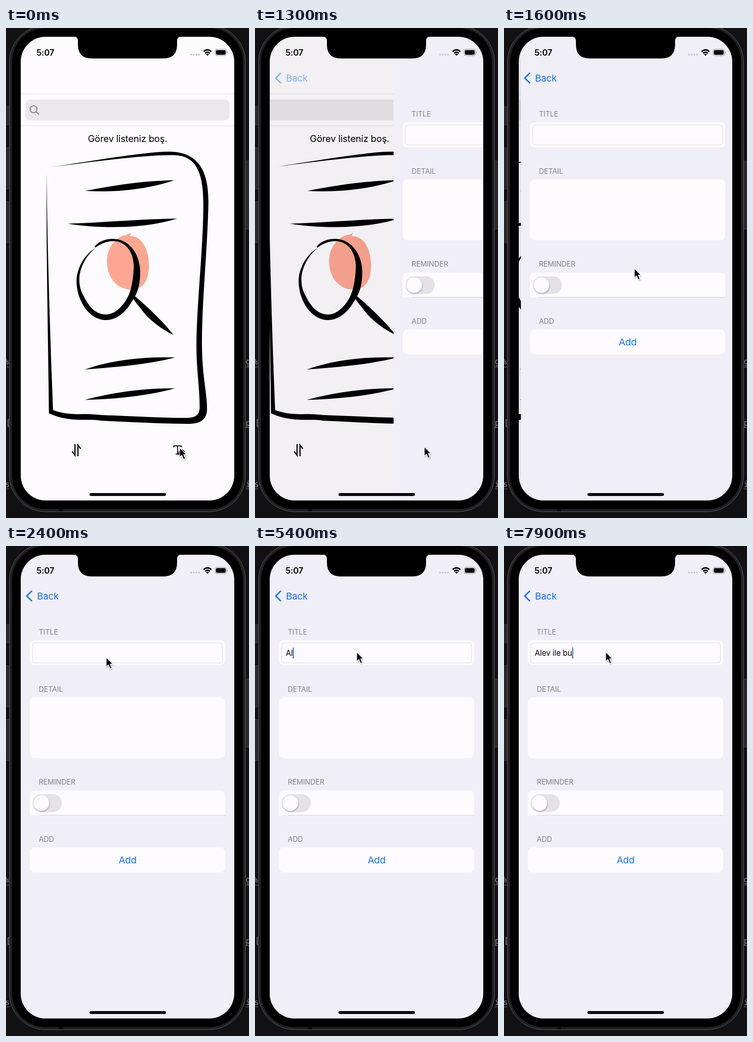
Write an HTML page without scripts that moves like this. It is 527 px wide and 1062 px high and loops after 8 s.

```html
<!DOCTYPE html>
<html lang="tr">
<head>
<meta charset="utf-8">
<title>Görev listesi</title>
<style>
@property --push { syntax: "<number>"; inherits: true; initial-value: 0; }
@property --typed { syntax: "<integer>"; inherits: true; initial-value: 0; }

html, body { margin: 0; width: 527px; height: 1062px; overflow: hidden; background: #111114; }
body { position: relative; font-family: Inter, "Open Sans", sans-serif; }
svg { display: block; }
text { letter-spacing: -.01em; }

.screen { animation: push 8s step-end infinite; }
.home { transform: translateX(calc(var(--push) * -139px)); }
.dim { opacity: calc(var(--push) * .105); }
.form { transform: translateX(calc((1 - var(--push)) * 463px)); }
.back { opacity: calc(var(--push) * 1.2); }
.pointer { animation: point 8s step-end infinite; }

.label { font-size: 15.7px; fill: #858389; }
.card { fill: #fdfbfe; }
.blue { fill: #1673e6; font-size: 20.5px; }
.rule { stroke: #dfdde2; stroke-width: 1.2; }
.code { font: 17px "DejaVu Sans Mono", monospace; fill: #85858a; }

.field {
  position: absolute; left: 66.5px; top: 220px; height: 24px;
  font-size: 17px; line-height: 24px; white-space: pre; color: #08080a;
  animation: type 8s step-end infinite;
}
.field span {
  font-size: calc(17px * clamp(0, var(--typed) - var(--i), 1));
  line-height: 0; letter-spacing: -.012em;
}
.field b {
  display: inline-block; width: 2.3px; height: 23.5px; vertical-align: top;
  background: #3563c3; animation: blink 8s step-end infinite;
}

@keyframes push {
  0% { --push: 0; }
  16.25% { --push: .42; }
  17.5% { --push: .84; }
  18.75% { --push: .96; }
  20% { --push: .99; }
  21.25%, 100% { --push: 1; }
}
@keyframes point {
  0% { transform: translate(376px, 909px); }
  2.5% { transform: translate(373px, 908px); }
  5% { transform: translate(369px, 907px); }
  7.5% { transform: translate(366.4px, 906.6px); }
  18.75% { transform: translate(350px, 825px); }
  20% { transform: translate(282px, 520px); }
  21.25% { transform: translate(230px, 295px); }
  22.5% { transform: translate(216.6px, 240.5px); }
  37.5% { transform: translate(219px, 234px); }
  38.75%, 100% { transform: translate(219.8px, 228.8px); }
}
@keyframes blink {
  0% { opacity: 0; }
  46.25% { opacity: 1; }
  55% { opacity: .5; }
  56.25% { opacity: 0; }
  60% { opacity: .5; }
  61.25%, 100% { opacity: 1; }
}
@keyframes type {
  0% { --typed: 0; }
  63.75% { --typed: 1; }
  66.25% { --typed: 2; }
  68.75% { --typed: 3; }
  71.25% { --typed: 4; }
  75% { --typed: 5; }
  80% { --typed: 6; }
  83.75% { --typed: 7; }
  86.25% { --typed: 8; }
  88.75% { --typed: 9; }
  92.5% { --typed: 10; }
  96.25%, 100% { --typed: 11; }
}
</style>
</head>
<body>
<svg width="527" height="1062" viewBox="0 0 527 1062">
  <defs>
    <clipPath id="glass"><rect x="32" y="19" width="463" height="1005" rx="54"/></clipPath>
    <filter id="soft" x="-50%" y="-50%" width="200%" height="200%">
      <feDropShadow dx="1" dy="2" stdDeviation="1.8" flood-opacity=".28"/>
    </filter>
  </defs>

  <!-- Desktop behind the device -->
  <g class="code">
    <text x="-4" y="729">%</text><text x="0" y="862">[</text><text x="-2" y="995">s</text>
    <text x="520" y="729">g</text><text x="520" y="862">p</text><text x="520" y="995">i</text>
    <path d="M0 735H7M0 999H7M520 735H527M520 866H527M520 999H527" stroke="#77777c"/>
  </g>
  <g fill="#29292c" stroke="#414145">
    <rect x="-4" y="170" width="12" height="40"/>
    <rect x="-4" y="259" width="12" height="90"/>
    <rect x="-4" y="376" width="12" height="89"/>
    <rect x="519" y="288" width="12" height="148"/>
  </g>

  <!-- Device body -->
  <rect x="7.5" y="-5.5" width="512" height="1054" rx="79" fill="#222225" stroke="#5b5b5f"/>
  <rect x="115" y="1043" width="9" height="5" fill="#0e0e10"/>
  <rect x="13" y="0" width="501" height="1043" rx="73"/>

  <g clip-path="url(#glass)">
    <g class="screen">
      <g class="home">
        <rect class="card" x="32" y="19" width="463" height="1005"/>
        <path class="rule" d="M32 143H495M32 212H495"/>
        <rect x="42" y="155" width="443" height="45" rx="11" fill="#eae8eb"/>
        <g fill="none" stroke="#7f7d82" stroke-width="2" stroke-linecap="round">
          <circle cx="59.7" cy="176" r="7.6"/><path d="M65.2 181.5L71 187"/>
        </g>
        <text x="263.5" y="247" font-size="20.2" text-anchor="middle">Görev listeniz boş.</text>

        <path fill="#fda793" d="M268 451C295 450 310 480 310 515C310 550 295 567 272 567C240 567 219 540 219 505C219 475 240 452 258 449Q266 447 271 444Z"/>
        <!-- Sheet outline -->
        <path d="M96 302C200 286 300 269 350 268C410 267 440 300 439 380C437 480 424 600 425 690C426 760 436 790 436 825C436 850 420 858 395 858C340 858 270 854 205 851C190 848 170 850 155 849C130 848 110 843 93 835C92 700 87 500 88 316C90 500 97 700 102 828C120 835 140 837 160 837C180 836 195 838 210 839C270 841 340 845 390 845C412 845 420 838 420 822C420 780 413 740 413 690C413 600 428 480 428 380C428 310 410 279 370 276C320 273 200 288 96 302Z"/>
        <!-- Brush lines -->
        <path d="M172 353C230 341 300 331 365 330C310 349 240 357 172 353Z
                 M134 424C210 422 290 414 371 413C300 436 200 435 134 424Z
                 M171 740C230 719 300 712 367 714C310 729 240 735 171 740Z
                 M171 806C230 790 300 780 366 781C310 797 240 804 171 806Z"/>
        <!-- Magnifier -->
        <path d="M192 474C200 463 215 457 232 457C265 457 290 487 291 528C291 560 284 578 271 596C258 618 238 633 217 633C180 633 153 590 153 548C153 520 172 488 196 476C175 490 159 520 159 545C159 560 163 572 168 580C180 605 195 621 217 621C240 621 262 595 270 568C275 550 277 530 277 515C276 485 260 464 236 462C220 461 205 467 194 476Z
                 M278 580C300 598 340 635 363 665C340 655 310 632 296 613C288 602 276 590 276 584Z"/>

        <!-- Toolbar -->
        <path d="M149.6 902V926L143.6 918M156 928V904L162 912" fill="none" stroke="#000" stroke-width="2.6"/>
        <path d="M363.8 909V905.8H380V909M372 906V923.5M368 923.5H376" fill="none" stroke="#000" stroke-width="1.9"/>
        <circle cx="381" cy="920.8" r="7.2"/>
        <path d="M377.3 920.8H384.7M381 917.1V924.5" stroke="#fdfbfe" stroke-width="1.5"/>
      </g>
      <rect class="dim" x="32" y="19" width="463" height="1005"/>

      <g class="form">
        <rect x="32" y="19" width="463" height="1005" fill="#f0eef6"/>
        <g class="label">
          <text x="71" y="191.5">TITLE</text><text x="71" y="315.5">DETAIL</text>
          <text x="71" y="517.3">REMINDER</text><text x="71" y="641">ADD</text>
        </g>
        <g class="card">
          <rect x="51.5" y="204" width="424" height="54.5" rx="11"/>
          <rect x="51.5" y="328" width="424" height="132" rx="11"/>
          <path d="M51.5 584V541Q51.5 530 62.5 530H464.5Q475.5 530 475.5 541V584Z"/>
          <rect x="51.5" y="653.5" width="424" height="54" rx="11"/>
        </g>
        <rect x="57.5" y="210" width="412" height="43.5" rx="6" fill="none" class="rule"/>
        <path d="M72 583.5H475.5" stroke="#d3d1d6" stroke-width="1.2"/>
        <rect x="57.5" y="538" width="63.5" height="38.5" rx="19.2" fill="#e4e2e6"/>
        <circle class="card" cx="76.7" cy="557.2" r="16.8" filter="url(#soft)"/>
        <text class="blue" x="263.7" y="688" text-anchor="middle">Add</text>
      </g>

      <g class="back">
        <path d="M55.5 98L45 108.4L55.5 118.8" fill="none" stroke="#1673e6" stroke-width="3" stroke-linecap="round" stroke-linejoin="round"/>
        <text class="blue" x="67.2" y="115.7">Back</text>
      </g>
    </g>

    <!-- Status bar -->
    <path d="M146 18Q156 19 156 28V36Q156 66 186 66H341Q371 66 371 36V28Q371 19 381 18Z"/>
    <text x="66" y="59.7" font-size="18.3" font-weight="600">5:07</text>
    <path d="M401.5 57.7H420" stroke="#c6c4c9" stroke-width="3.8" stroke-linecap="round" stroke-dasharray="0 5.7"/>
    <path d="M428.6 51.2Q437 43.6 445.4 51.2M431.8 54.8Q437 50.2 442.2 54.8" fill="none" stroke="#000" stroke-width="3"/>
    <path d="M433.7 57Q437 54.4 440.3 57L437 60.3Z"/>
    <rect x="453.5" y="46.2" width="24.5" height="13.6" rx="4" fill="none" stroke="#98969b" stroke-width="1.2"/>
    <rect x="455.3" y="48" width="21" height="10" rx="2.4"/>
    <path d="M479.5 50.5Q482.5 53 479.5 55.5Z" fill="#98969b"/>
    <rect x="181" y="1008" width="166" height="6.2" rx="3.1"/>
  </g>

  <g class="pointer">
    <path d="M.7 .7V21.5L5.4 17L9.2 25.8L13 24.2L9.3 15.6H15.2Z" stroke="#fff" stroke-width="1.4" stroke-linejoin="round" filter="url(#soft)"/>
  </g>
</svg>
<div class="field"><span style="--i:0">A</span><span style="--i:1">l</span><span style="--i:2">e</span><span style="--i:3">v</span><span style="--i:4"> </span><span style="--i:5">i</span><span style="--i:6">l</span><span style="--i:7">e</span><span style="--i:8"> </span><span style="--i:9">b</span><span style="--i:10">u</span><b></b></div>
</body>
</html>
```
